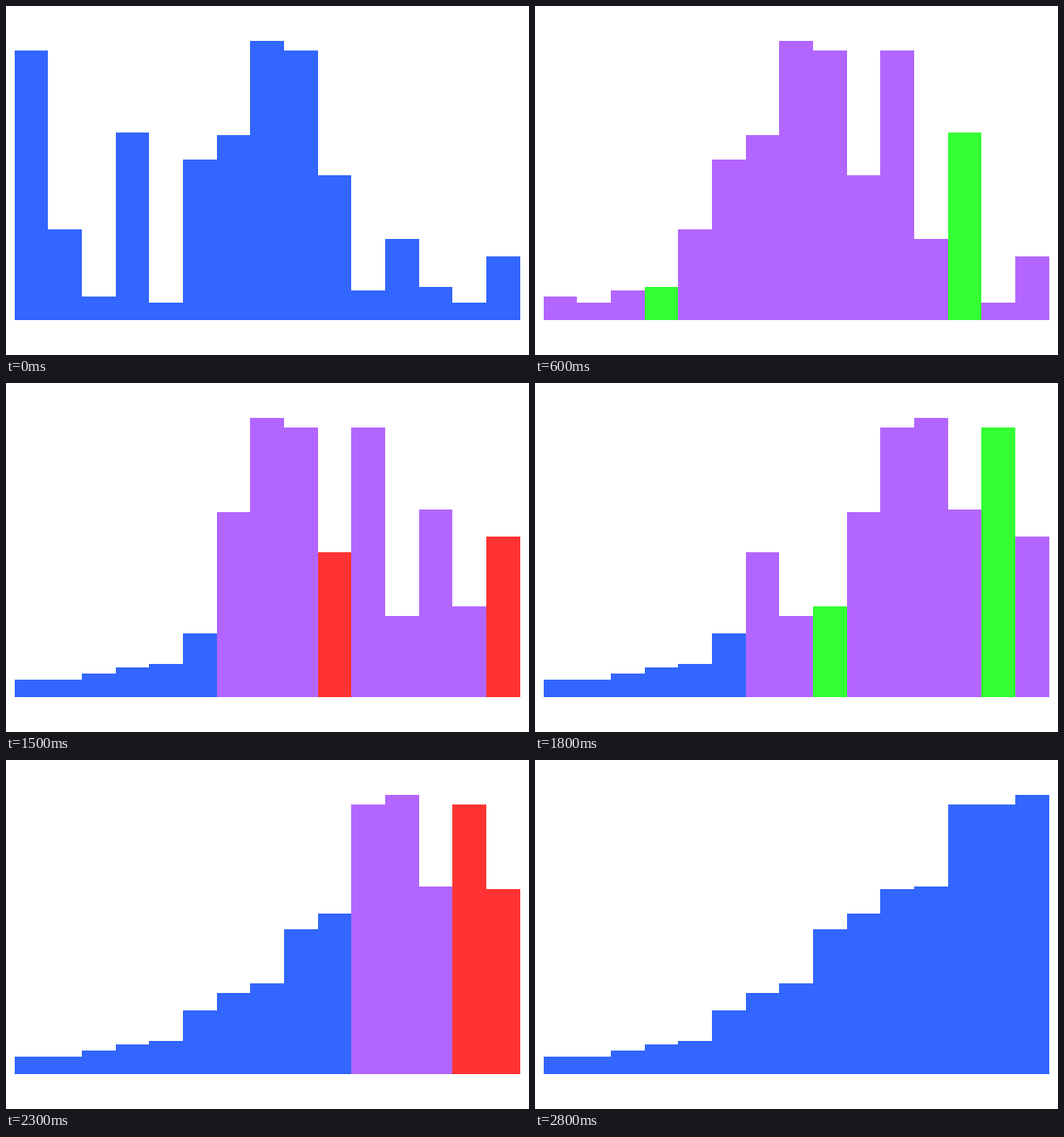
Recreate the animation shown at these times as a matplotlib script. Size 600 px wide and 400 px high, loop 2.9 s.

```python
import matplotlib.pyplot as plt
from matplotlib.animation import FuncAnimation
from matplotlib.patches import Rectangle

W, H, DPI = 600, 400, 100
LEFT, SPAN, BASE = 10, 580, 360
IDLE, ACTIVE, COMPARE, SWAP = "#3366ff", "#b366ff", "#ff3333", "#33ff33"
HEIGHTS = [309, 104, 27, 215, 20, 184, 212, 320, 309, 166, 34, 93, 38, 20, 73]
COMPARE_EVERY = 5  # only each fifth comparison is shown


def record_quicksort(values):
    """Return a list of (heights, colours), one entry per shown step."""
    data = list(values)
    n = len(data)
    steps = [(data[:], [IDLE] * n)]
    compared = 0

    def record(lo, hi, pair, color):
        colors = [ACTIVE if lo <= k <= hi else IDLE for k in range(n)]
        for k in pair:
            colors[k] = color
        steps.append((data[:], colors))

    def swap(a, b, lo, hi):
        if a != b:
            data[a], data[b] = data[b], data[a]
            record(lo, hi, (a, b), SWAP)

    def sort(lo, hi):
        nonlocal compared
        if lo >= hi:
            return
        store = lo
        for j in range(lo, hi):
            compared += 1
            if compared % COMPARE_EVERY == 0:
                record(lo, hi, (j, hi), COMPARE)
            if data[j] <= data[hi]:
                swap(store, j, lo, hi)
                store += 1
        swap(store, hi, lo, hi)
        sort(lo, store - 1)
        sort(store + 1, hi)

    sort(0, n - 1)
    steps.append((data[:], [IDLE] * n))
    return steps


steps = record_quicksort(HEIGHTS)

fig = plt.figure(figsize=(W / DPI, H / DPI), dpi=DPI, facecolor="white")
ax = fig.add_axes([0, 0, 1, 1])
ax.set_xlim(0, W)
ax.set_ylim(H, 0)
ax.axis("off")

count = len(HEIGHTS)
edges = [LEFT + SPAN * k // count for k in range(count + 1)]
bars = [
    ax.add_patch(Rectangle((x0, BASE), x1 - x0, 0, linewidth=0, antialiased=False))
    for x0, x1 in zip(edges, edges[1:])
]


def draw(frame):
    heights, colors = steps[frame]
    for bar, height, color in zip(bars, heights, colors):
        bar.set_y(BASE - height)
        bar.set_height(height)
        bar.set_facecolor(color)
    return bars


anim = FuncAnimation(fig, draw, frames=len(steps), interval=100,
                     repeat=True, repeat_delay=0, blit=False)
plt.show()
```
